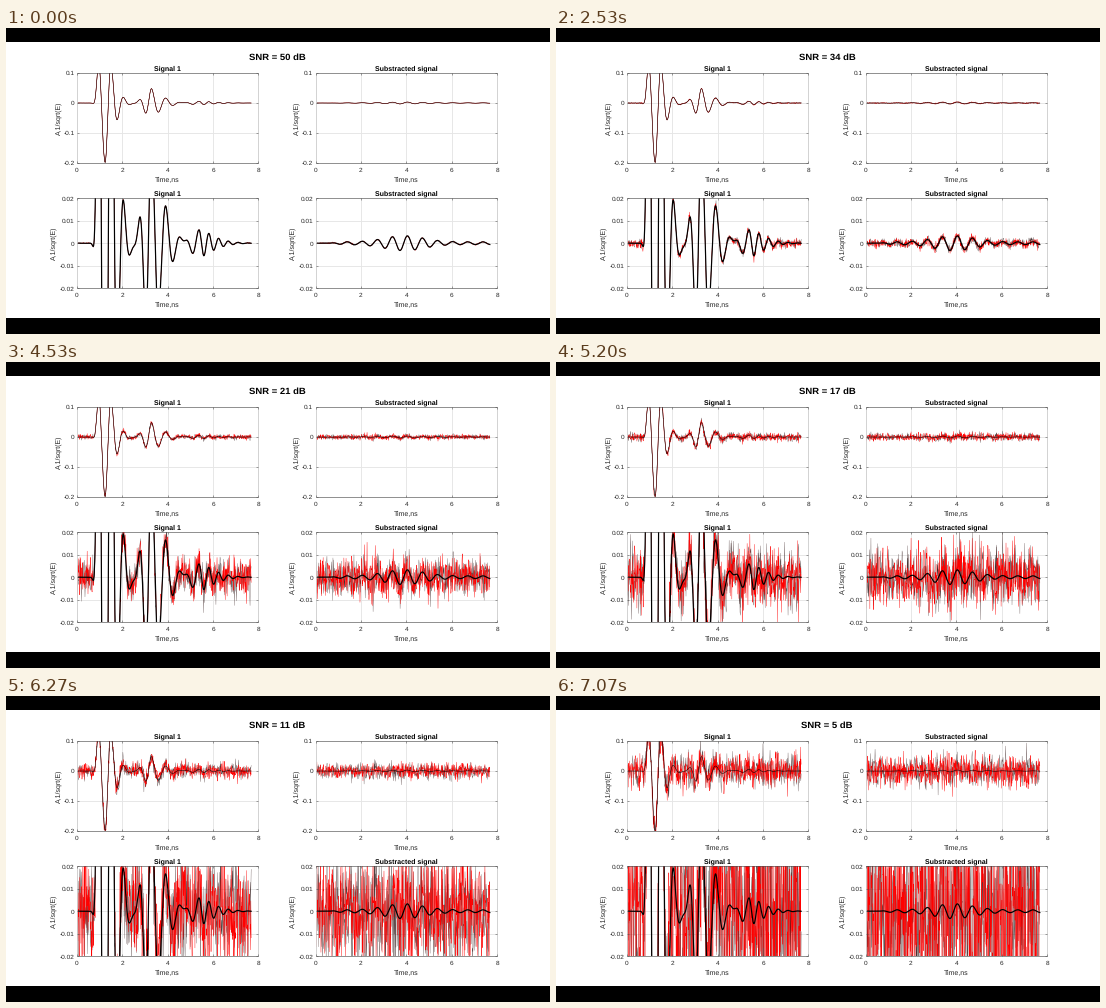
A matplotlib script that plays this animation: 544 px wide and 306 px high, repeating every 7.27 s.

```python
import matplotlib.pyplot as plt
import numpy as np
from matplotlib.animation import FuncAnimation
from matplotlib.collections import LineCollection
from matplotlib.patches import Rectangle

W, H, DPI = 544, 306, 100
LOOP, FRAMES = 7270, 363
STEP = LOOP / FRAMES
PT = 72 / DPI
FIRST_SNR, LAST_SNR = 50, 5
COUNT = FIRST_SNR - LAST_SNR + 1
NOISE_AT_0DB = 0.047
INK, EDGE, SIDE, GRID = "#262626", "#4a4a4a", "#cfcfcf", "#e5e5e5"

# Levels are evenly spread, then snapped to video ticks of 1/15 s.
ticks = np.floor(np.arange(COUNT) * 109 / COUNT + 0.26)
starts = np.round(ticks * 100 / 15) * 10

plt.rcParams.update({"font.family": "Liberation Sans", "text.hinting": "none"})


def burst(t, center, amp, left, right):
    """Ringing pulse; each side has its own period, width and falloff power."""
    d = t - center
    period, width, power = (np.where(d < 0, a, b) for a, b in zip(left, right))
    return amp * np.cos(2 * np.pi * d / period) * np.exp(-(np.abs(d) / width) ** power)


def signal(t):
    return (burst(t, 1.25, -0.198, (0.66, 0.38, 4), (0.55, 0.46, 1.5))
            + burst(t, 3.29, 0.048, (0.54, 0.44, 2), (0.64, 0.6, 1.2))
            + burst(t, 5.39, 0.006, (0.56, 0.7, 2), (0.43, 0.85, 1.5)))


def residue(t):
    onset = np.clip((t - 0.6) / 0.6, 0, 1)
    swell = 0.0027 * np.exp(-((t - 3.9) / 1.2) ** 2) + 0.0006
    return onset * swell * np.cos(2 * np.pi * (t - 4.05) / 0.665)


t_fine = np.linspace(0, 7.68, 1200)
t_noise = np.linspace(0, 7.68, 640)

fig = plt.figure(figsize=(W / DPI, H / DPI), dpi=DPI, facecolor="black")
ax = fig.add_axes([0, 0, 1, 1])
ax.set(xlim=(0, W), ylim=(H, 0))
ax.axis("off")
ax.add_patch(Rectangle((0, 14), W, 276, fc="white", lw=0, zorder=0))


def label(x, y, s, px, **kw):
    kw = {"ha": "center", "va": "baseline", "color": INK, **kw}
    return ax.text(x, y, s, fontsize=px * PT, **kw)


def strokes(segs, color, px, z):
    ax.add_collection(LineCollection(segs, colors=color, linewidths=px * PT, zorder=z))


class Panel:
    WIDTH, HEIGHT, SPAN = 181.6, 90, 8

    def __init__(self, x, y, title, lo, hi, gap, curve, weight, name_x):
        self.x, self.y, self.lo, self.hi = x, y, lo, hi
        right, bottom, mid = x + self.WIDTH, y + self.HEIGHT, x + self.WIDTH / 2
        self.clip = Rectangle((x, y), self.WIDTH, self.HEIGHT, transform=ax.transData)

        times = range(0, self.SPAN + 1, 2)
        marks = np.arange(round(lo / gap), round(hi / gap) + 1) * gap
        xs = [self.px(v) for v in times]
        ys = [self.py(v) for v in marks]
        strokes([[(p, y), (p, bottom)] for p in xs[1:-1]]
                + [[(x, q), (right, q)] for q in ys[1:-1]], GRID, 0.9, 1)
        strokes([[(p, y), (p, bottom)] for p in (x, right)], SIDE, 0.9, 6)
        strokes([[(x, q), (right, q)] for q in (y, bottom)], EDGE, 0.6, 6)
        strokes([[(p, q), (p, q + s)] for p in xs for q, s in ((bottom, -2), (y, 2))]
                + [[(p, q), (p + s, q)] for q in ys for p, s in ((x, 2), (right, -2))],
                EDGE, 0.5, 6)

        for p, v in zip(xs, times):
            label(p, bottom + 8.8, str(v), 6.5)
        for q, v in zip(ys, marks):
            label(x - 2.3, q + 2.4, f"{v:g}", 6.5, ha="right")
        label(mid, y - 2.9, title, 7.05, weight="bold", color="black")
        label(mid, bottom + 17.8, "Time,ns", 7.05)
        label(name_x, y + self.HEIGHT / 2, "A,1/sqrt(E)", 7.05, rotation=90, va="center")

        self.base = curve(t_noise)
        self.dark = self.line(t_noise, self.base, "#301818", 0.25, 3)
        self.red = self.line(t_noise, self.base, "red", 0.4, 4)
        self.line(t_fine, curve(t_fine), "black", weight, 5)

    def px(self, t):
        return self.x + t / self.SPAN * self.WIDTH

    def py(self, v):
        return self.y + (self.hi - v) / (self.hi - self.lo) * self.HEIGHT

    def line(self, t, v, color, px, z):
        ln, = ax.plot(self.px(t), self.py(v), color=color, lw=px * PT, zorder=z)
        ln.set_clip_path(self.clip)
        return ln

    def set_noise(self, dark, red):
        self.dark.set_ydata(self.py(self.base + dark))
        self.red.set_ydata(self.py(self.base + red))


columns = [
    [Panel(x, 45, title, -0.2, 0.1, 0.1, curve, 0.5, x - 18.5),
     Panel(x, 170.2, title, -0.02, 0.02, 0.01, curve, 1.2, x - 23)]
    for x, title, curve in ((70.8, "Signal 1", signal),
                            (309.5, "Substracted signal", residue))
]
heading = label(271.2, 31.6, "", 9.5, weight="bold", color="black")


def update(i):
    k = int(np.searchsorted(starts, (i + 1) * STEP)) - 1
    snr = FIRST_SNR - k
    sigma = NOISE_AT_0DB * 10 ** (-snr / 20)
    rng = np.random.default_rng(100 + k)
    heading.set_text(f"SNR = {snr} dB")
    for column in columns:
        dark, red = rng.normal(0, sigma, (2, t_noise.size))
        for panel in column:
            panel.set_noise(dark, red)
    return []


anim = FuncAnimation(fig, update, frames=FRAMES, interval=STEP,
                     init_func=lambda: update(0), repeat=True, repeat_delay=0)
plt.show()
```
